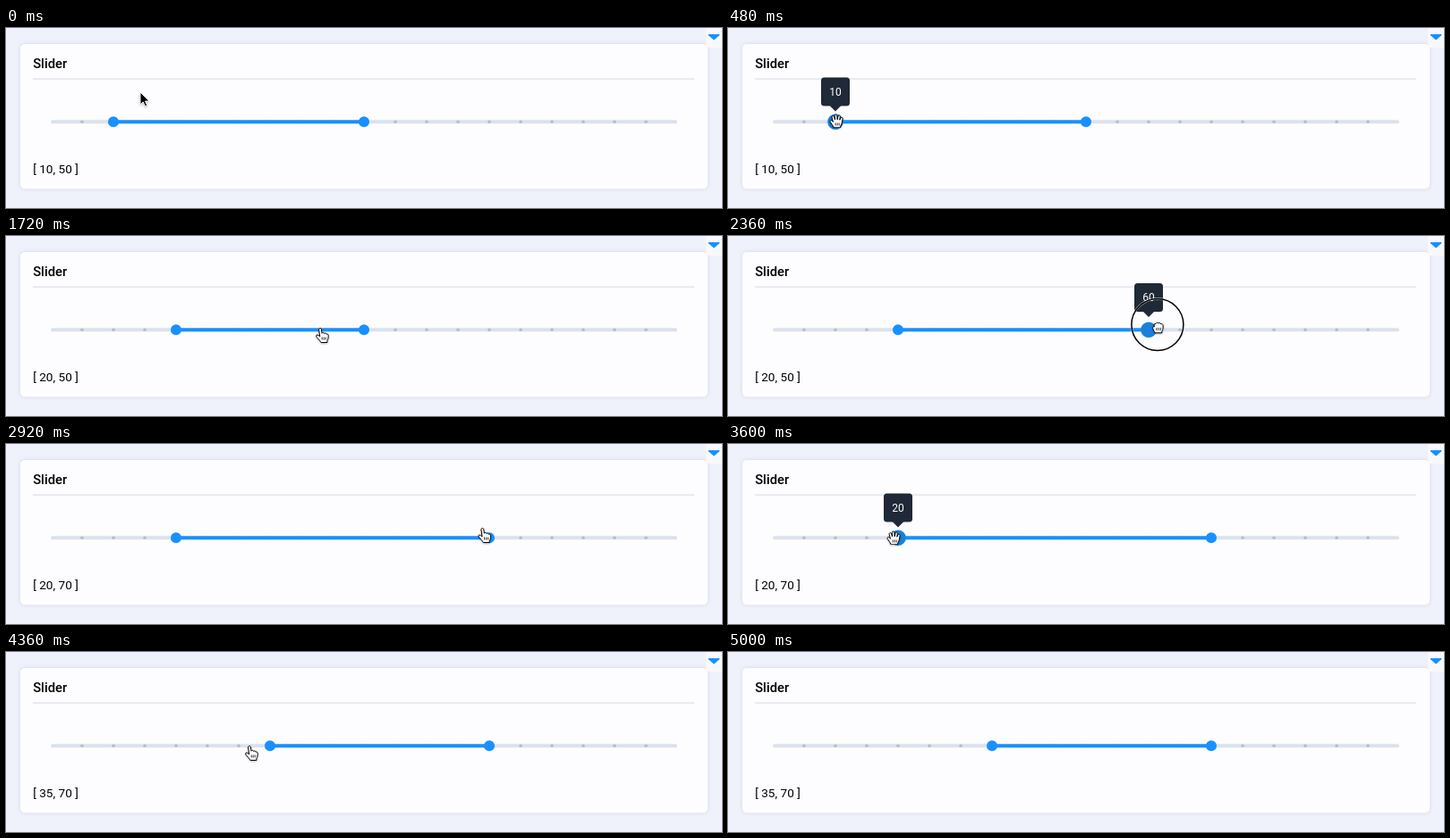
Recreate the animation shown at these times as an HTML page. Size 800 by 202 pixels, loop 5.88 s.

```html
<!DOCTYPE html>
<html lang="en">
<head>
<meta charset="utf-8">
<title>Range slider</title>
<style>
  html, body { margin: 0; width: 100%; height: 100%; overflow: hidden; background: #eff2fb; }
  svg { display: block; width: 800px; height: 202px; font-family: Roboto, sans-serif; }
  .card { fill: #fdfcff; filter: drop-shadow(0 0 2px rgba(60, 70, 110, .16)); }
  .title { font-size: 14.8px; font-weight: 500; }
  .value { font-size: 13.6px; }
  .rail { fill: #dbe2ee; }
  .ticks circle { fill: #b5bdcb; }
  .accent { fill: #1890ff; }
  .thumb { fill: #1890ff; }
  .thumb.hover { fill: #1a80dc; }
  .tip { fill: #1f2937; }
  .tip text { fill: #fff; font-size: 12px; text-anchor: middle; }
  .ring circle { fill: none; }
  .cursor { filter: drop-shadow(0 1px 1px rgba(0, 0, 0, .28)); }
  .hand { fill: #fff; stroke: #000; stroke-linejoin: round; stroke-linecap: round; }
  .fold { fill: none; stroke: #000; stroke-width: .8; }
</style>
</head>
<body>
<svg viewBox="0 0 800 202">
  <rect width="800" height="202" fill="#eff2fb"/>
  <rect class="card" x="16" y="18" width="768" height="162.5" rx="5"/>
  <path d="M782 0H800V22H786Q782 22 782 18Z" fill="#f8f9fe"/>
  <path class="accent" d="M785.5 7H796.5Q798 7 797 8.2L791.8 13Q791 13.6 790.2 13L785 8.2Q784 7 785.5 7Z"/>
  <text class="title" x="30.2" y="45.4">Slider</text>
  <rect x="30" y="56.5" width="739" height="1.3" fill="#e2e2e8"/>

  <rect class="rail" x="50" y="103.3" width="700" height="4" rx="2"/>
  <g class="ticks" id="ticks"></g>
  <rect class="accent" id="span" y="103.3" height="4"/>
  <circle class="thumb" cy="105.2"/>
  <circle class="thumb" cy="105.2"/>
  <text class="value" id="value" x="30.2" y="163"></text>

  <g class="tip" id="tip">
    <rect x="-16" y="53" width="32" height="32" rx="3.5"/>
    <path d="M-6.5 84.5H6.5L0 91Z"/>
    <text id="tipText" y="73.3"></text>
  </g>
  <g id="pointer">
    <g class="ring" id="ring">
      <circle r="29" stroke="#fff" stroke-width="2.6" stroke-opacity=".6"/>
      <circle r="29" stroke="#000" stroke-width="1.5"/>
    </g>
    <g class="cursor" id="arrow">
      <path d="M0 0V14L3.3 11L5.5 16L7.8 15L5.6 10.1H10Z" stroke="#fff"/>
    </g>
    <g class="cursor" id="point">
      <path class="hand" d="M-1.4 .6C-1.4 -1 1.2 -1 1.4 .6L2 5.2C2.4 4 4.4 4.1 4.6 5.5C5.2 4.6 7 4.9 7.1 6.3C8 5.6 9.3 6.2 9.2 7.8C9.2 11 8.8 11.6 7.9 13.6V15.5H1C.4 14 -2.5 11.2 -4 9.2C-5.2 7.4 -3.4 6.2 -1.8 7.6L-.6 8.6Z"/>
      <path class="fold" d="M2.2 9.5V12.5M4.2 9.5V12.5M6.2 9.5V12.5"/>
    </g>
    <g class="cursor" id="open">
      <path class="hand" d="M-3 10.5C-4 8 -5.5 6.5 -6.6 4.6C-7.6 2.6 -5.6 1.8 -4.4 3.4L-3.6 4.4L-4.8 -.6C-5.2 -2.6 -2.9 -3 -2.4 -1.2L-1.4 2L-1.7 -2.6C-1.7 -4.4 .6 -4.5 .8 -2.7L1.2 1.8L2 -2C2.4 -3.8 4.6 -3.3 4.3 -1.5L3.8 2.2L4.9 0C5.7 -1.5 7.6 -.6 7.1 1C6.4 4 6.6 6 5 8.4L4.6 10.5Z"/>
      <path class="fold" d="M-.8 5.5V8.5M1.2 5.5V8.5M3.2 5.5V8.5"/>
    </g>
    <g class="cursor" id="closed">
      <path class="hand" d="M-3 9C-3.5 7.5 -5 6 -5.2 4C-5.3 2 -3.8 1.8 -3.4 2.4C-4.2 0 -3.6 -1.6 -1.8 -1C-1.2 -2.6 .8 -2.4 1 -1.3C1.8 -2.4 3.6 -2 3.7 -.6C4.8 -1.2 6.4 -.4 6.3 1.4C6.3 5 5.8 6 5 7.4V9Z"/>
      <path class="fold" d="M-1 3.5V6.5M1.2 3.5V6.5M3.4 3.5V6.5"/>
    </g>
  </g>
</svg>
<script>
const LOOP = 5880, STEP = 40, LEAVE = 5000, RAIL_Y = 105.2;
const el = id => document.getElementById(id);
const thumbs = [...document.querySelectorAll('.thumb')];
const cursors = ['arrow', 'point', 'open', 'closed'];

// Pointer path: time, x, y
const path = [
  [0, 150, 72], [440, 121, 101], [640, 121, 101], [880, 168, 100],
  [1080, 183, 100], [1480, 183, 100], [1600, 270, 107], [1720, 351, 104],
  [1920, 400, 100], [2160, 400, 100], [2520, 537, 99], [2600, 537, 99],
  [2680, 540, 95], [2880, 540, 95], [3080, 420, 96], [3320, 178, 98],
  [3480, 185, 102], [3680, 185, 102], [4040, 288, 106], [4160, 288, 106],
  [4320, 272, 106], [4520, 272, 106], [4720, 360, 108], [4960, 478, 72]
];

// Each drag: thumb index, values, press/release, tooltip show/hide
const drags = [
  { thumb: 0, from: 10, to: 20, down: 520, up: 1160, show: 400, hide: 1240 },
  { thumb: 1, from: 50, to: 70, down: 2160, up: 2600, show: 1880, hide: 2720 },
  { thumb: 0, from: 20, to: 35, down: 3640, up: 4120, show: 3440, hide: 4200 }
];

const toX = v => 50 + v * 7;
const clamp = (v, a, b) => Math.min(b, Math.max(a, v));
const show = (node, on) => node.setAttribute('display', on ? 'inline' : 'none');

function slope(i, axis) {
  const a = path[i - 1], b = path[i], c = path[i + 1];
  if (!a || !c) return 0;
  const before = (b[axis] - a[axis]) / (b[0] - a[0]);
  const after = (c[axis] - b[axis]) / (c[0] - b[0]);
  return before * after > 0 ? 2 * before * after / (before + after) : 0;
}

// Monotone cubic between path points
function along(t, axis) {
  const i = path.findIndex(p => p[0] > t) - 1;
  if (i < 0) return path[path.length - 1][axis];
  const a = path[i], b = path[i + 1], d = b[0] - a[0], u = (t - a[0]) / d;
  const ease = u * u * (3 - 2 * u);
  return a[axis] + (b[axis] - a[axis]) * ease
    + d * u * (1 - u) * ((1 - u) * slope(i, axis) - u * slope(i + 1, axis));
}

function draw(t) {
  const x = along(t, 1), y = along(t, 2);
  const live = [10, 50], saved = [10, 50];
  let held = null, tip = null;
  for (const d of drags) {
    if (t >= d.up) live[d.thumb] = saved[d.thumb] = d.to;
    else if (t >= d.down) {
      held = d;
      live[d.thumb] = clamp(Math.round((x - 50) / 35) * 5, d.from, d.to);
    }
    if (t >= d.show && t < d.hide) tip = d;
  }

  const present = t < LEAVE;
  let over = false;
  thumbs.forEach((node, i) => {
    const cx = toX(live[i]);
    const hover = present && (held ? held.thumb === i : Math.hypot(x - cx, y - RAIL_Y) < 11.5);
    over = over || hover;
    node.setAttribute('cx', cx);
    node.setAttribute('r', hover ? 8.8 : 6);
    node.classList.toggle('hover', hover);
  });
  el('span').setAttribute('x', toX(live[0]));
  el('span').setAttribute('width', toX(live[1]) - toX(live[0]));
  el('value').textContent = `[ ${saved.join(', ')} ]`;

  show(el('tip'), tip);
  if (tip) {
    const v = live[tip.thumb];
    el('tip').setAttribute('transform', `translate(${toX(v)} ${t < tip.down ? 2.5 : 0})`);
    el('tipText').textContent = v;
  }

  const kind = held ? 'closed' : over ? 'open' : Math.abs(y - RAIL_Y) < 11 ? 'point' : 'arrow';
  show(el('pointer'), present);
  show(el('ring'), held);
  el('pointer').setAttribute('transform', `translate(${x} ${y})`);
  cursors.forEach(id => show(el(id), id === kind));
}

for (let v = 5; v < 100; v += 5) {
  const dot = document.createElementNS('http://www.w3.org/2000/svg', 'circle');
  dot.setAttribute('cx', toX(v));
  dot.setAttribute('cy', RAIL_Y);
  dot.setAttribute('r', 1.8);
  el('ticks').append(dot);
}

const start = performance.now();
function tick() {
  const t = (performance.now() - start) % LOOP;
  draw(Math.floor(t / STEP) * STEP);
  requestAnimationFrame(tick);
}
tick();
</script>
</body>
</html>
```
